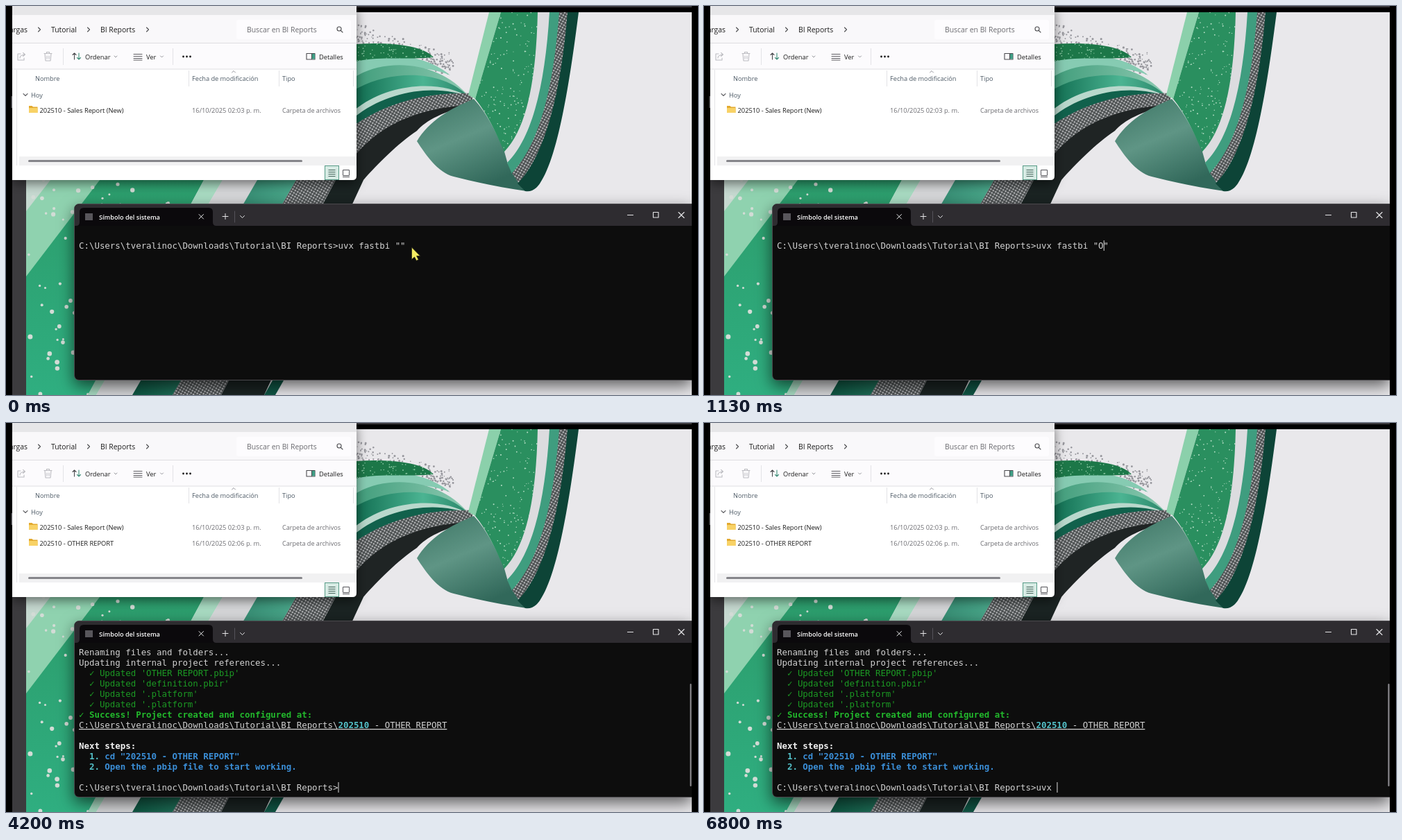
An HTML page that plays this animation: 997x561 px, repeating every 8 s.

```html
<!DOCTYPE html>
<html lang="es">
<head>
<meta charset="utf-8">
<title>Terminal</title>
<style>
  html, body { margin: 0; width: 100%; height: 100%; overflow: hidden; background: #000; }
  svg { display: block; width: 100%; height: 100%; }
  text { white-space: pre; }
  .ui { font: 9.3px "Open Sans", sans-serif; fill: #1c1c1c; }
  .ui .nav { font-size: 10.4px; }
  .ui .dim { fill: #6b6b70; }
  .ui .head { fill: #4d5a66; font-size: 9.2px; }
  .term { font: 12.425px "DejaVu Sans Mono", monospace; fill: #d2d2d2; }
  .ok { fill: #1c9a24; }
  .done { fill: #22b92c; font-weight: bold; }
  .num { fill: #55c3cb; font-weight: bold; }
  .cmd { fill: #3b8fd8; font-weight: bold; }
  .line { fill: none; stroke-linecap: round; stroke-linejoin: round; }
</style>
</head>
<body>
<svg viewBox="0 0 997 561" preserveAspectRatio="none">
  <defs>
    <pattern id="mesh" width="4" height="4" patternUnits="userSpaceOnUse" patternTransform="rotate(30)">
      <rect width="4" height="4" fill="#4b4f50"/><circle cx="2" cy="2" r="1.3" fill="#b9babc"/>
    </pattern>
    <linearGradient id="panel" x1="0" y1="0" x2=".5" y2="1">
      <stop offset="0" stop-color="#3c7564"/><stop offset=".5" stop-color="#5f9585"/><stop offset="1" stop-color="#31685a"/>
    </linearGradient>
    <linearGradient id="green" x1="0" y1="0" x2="0" y2="1">
      <stop offset="0" stop-color="#2c9d6c"/><stop offset="1" stop-color="#2fae80"/>
    </linearGradient>
    <linearGradient id="teal"><stop offset="0" stop-color="#0d5541"/><stop offset="1" stop-color="#4aa88b"/></linearGradient>
    <linearGradient id="arc"><stop offset="0" stop-color="#0f6b4f"/><stop offset=".6" stop-color="#4bb492"/><stop offset="1" stop-color="#2a8468"/></linearGradient>
    <linearGradient id="mint"><stop offset="0" stop-color="#3f9c7a"/><stop offset="1" stop-color="#8fcbb3"/></linearGradient>
    <clipPath id="inLeft"><path d="M29 251H285L118 561H29Z"/></clipPath>
    <clipPath id="inRight"><path d="M713 9H768C767 90 755 175 718 211C705 180 693 155 676 134Z"/></clipPath>
    <clipPath id="inBack"><path d="M504 55C550 52 600 56 616 74C580 78 540 72 504 80Z"/></clipPath>
    <clipPath id="stage"><rect x="9" width="979" height="561"/></clipPath>
    <filter id="shade" x="-10%" y="-15%" width="120%" height="130%">
      <feDropShadow dx="0" dy="5" stdDeviation="8" flood-opacity=".5"/>
    </filter>
    <filter id="deepShade" x="-10%" y="-25%" width="120%" height="150%">
      <feDropShadow dx="0" dy="8" stdDeviation="11" flood-opacity=".6"/>
    </filter>
  </defs>

  <rect width="997" height="561"/>
  <g clip-path="url(#stage)">
    <!-- wallpaper -->
    <rect x="505" width="483" height="2" fill="#38363a"/>
    <rect x="9" y="251" width="20" height="310" fill="#3c3b3e"/>
    <rect x="29" y="9" width="959" height="552" fill="#e9e8eb"/>
    <g id="cloud" fill="#96969c"/>
    <path d="M500 78C540 68 600 66 640 100C600 84 550 84 500 108Z" fill="#86cbb2"/>
    <path d="M504 55C550 52 600 56 616 74C580 78 540 72 504 80Z" fill="#1c7748"/>
    <g id="backDots" fill="#8cc9a4" clip-path="url(#inBack)"/>
    <path d="M500 104C545 74 625 78 668 132C620 98 560 96 500 126Z" fill="url(#mint)"/>
    <path d="M500 122C555 90 630 92 668 132C620 108 560 114 500 156Z" fill="url(#arc)"/>
    <path d="M500 152C545 112 625 104 668 132C610 118 560 137 500 178Z" fill="#b9d8cc"/>
    <path d="M500 162C550 120 625 112 668 132C610 122 555 145 500 192Z" fill="#11614c"/>
    <path d="M418 251C475 182 545 122 672 126V146C590 146 540 172 475 251Z" fill="url(#mesh)"/>
    <path d="M475 251C515 195 555 150 672 142C630 152 605 165 592 180C565 198 535 228 515 251Z" fill="#1f2424"/>
    <path d="M674 134C640 148 610 165 592 195C605 215 622 240 645 246C680 255 715 262 750 267C735 255 728 235 719 211C705 180 693 155 674 134Z" fill="url(#panel)"/>
    <path d="M696 9H713L676 134L666 128Z" fill="#8bd0ab"/>
    <path d="M713 9H768C767 90 755 175 718 211C705 180 693 155 676 134Z" fill="#2a8f5f"/>
    <g id="rightDots" fill="#b9e0c8" clip-path="url(#inRight)"/>
    <path d="M766 9H784C778 110 760 195 723 228L718 210C752 175 764 100 766 9Z" fill="#dcdcdf"/>
    <path d="M783 9H798C790 115 771 203 729 242L722 226C759 190 777 110 783 9Z" fill="#3f9d7f"/>
    <path d="M797 9H811C801 118 779 215 740 257L729 241C770 197 789 115 797 9Z" fill="url(#mesh)"/>
    <path d="M809 9H825C814 95 796 225 766 260Q758 269 748 267L737 256C778 215 800 120 809 9Z" fill="#0d4437"/>

    <path d="M29 251H285L118 561H29Z" fill="url(#green)"/>
    <path d="M29 251H135L29 390Z" fill="#8fd2af"/>
    <path d="M29 251H64L29 296Z" fill="#c6d9d0"/>
    <g id="leftDots" fill="#d3dcd6" clip-path="url(#inLeft)"/>
    <path d="M285 251H312L130 561H118Z" fill="#a9dcc3"/>
    <path d="M312 251H362L182 561H130Z" fill="#d6d7d9"/>
    <path d="M362 251H418L240 561H182Z" fill="url(#teal)"/>
    <path d="M418 251H475L310 561H240Z" fill="url(#mesh)"/>
    <path d="M475 251H515L372 561H310Z" fill="#1a2322"/>
    <path d="M384 540H400L388 561H372Z" fill="#0f5544"/>

    <!-- file window -->
    <g class="ui">
      <path d="M9 0H505V245Q505 251 499 251H9Z" fill="#fff" filter="url(#shade)"/>
      <rect x="9" width="496" height="13" fill="#e6e6e8"/>
      <rect x="9" y="13" width="496" height="40" fill="#f9f8fa"/>
      <rect x="332" y="20" width="165" height="28" rx="3" fill="#fdfcfe"/>
      <rect x="9" y="53" width="496" height="38" fill="#fcfbfd"/>
      <path d="M9 53.5H505M9 91H505" stroke="#dedee1"/>
      <path d="M263.5 93V116M393.5 93V116M500.5 93V116M15.5 92V230M82.5 61V85M240.5 61V85" stroke="#e3e3e6"/>
      <rect x="19" y="217" width="486" height="13" fill="#f1f1f2"/>
      <rect x="32" y="222" width="395" height="3" rx="1.5" fill="#85858a"/>
      <rect x="459.5" y="230.5" width="20" height="20" fill="#d7ebe4" stroke="#579b87"/>
      <path d="M464.500 236.500H474.500M464.500 239.500H474.500M464.500 242.500H474.500M464.500 245.500H474.500" stroke="#46625a"/>
      <path d="M485.500 236.500H494.500V244.500H485.500ZM485 246.500H495" fill="none" stroke="#55555a"/>
      <g class="line" stroke="#4a4a4e" stroke-width="1.1">
        <path d="M46.500 31L49.500 34L46.500 37M117.500 31L120.500 34L117.500 37M202.500 31L205.500 34L202.500 37"/>
        <circle cx="480" cy="33" r="3"/><path d="M482.300 35.300L485 38"/>
        <path d="M325.500 96L328 93.500L330.500 96M156 72L158 74L160 72M222.500 72L224.500 74L226.500 72" stroke="#8a8a90" stroke-width=".9"/>
        <path d="M25 126.500L28 129.500L31 126.500" stroke="#66666a"/>
        <path d="M98.500 77V68M96 70.500L98.500 68L101 70.500"/>
        <path d="M105 68V77M102.500 74.500L105 77L107.500 74.500" stroke="#3f8f7a"/>
        <path d="M184 69.500H196M184 72.500H196M184 75.500H196M184 78H196" stroke-width=".9"/>
        <path d="M433 68.500H445V77H433ZM440.500 68.500V77"/><path d="M441 69H445V76.500H441Z" fill="#3f9d85" stroke="none"/>
        <path d="M21 69H17V78H26V75M20 75Q20 71 27 70M24.500 67.500L27.500 70L24.500 72.500M55 68.500H66M58.500 68V66.500H62.500V68M56 69L57 79H64L65 69M59 72V76M62 72V76" stroke="#bcbcc1"/>
      </g>
      <g fill="#1c1c1c"><circle cx="255.500" cy="73" r="1.400"/><circle cx="260.500" cy="73" r="1.400"/><circle cx="265.500" cy="73" r="1.400"/></g>
      <g class="nav">
        <text x="31" y="38" text-anchor="end">Descargas</text>
        <text x="65" y="38">Tutorial</text>
        <text x="136" y="38">BI Reports</text>
        <text x="347" y="38" class="dim">Buscar en BI Reports</text>
      </g>
      <text x="114" y="76.500">Ordenar</text>
      <text x="202" y="76.500">Ver</text>
      <text x="451" y="76.500">Detalles</text>
      <text x="42" y="107.500" class="head">Nombre</text>
      <text x="268" y="107.500" class="head">Fecha de modificación</text>
      <text x="398" y="107.500" class="head">Tipo</text>
      <text x="36" y="132" class="head">Hoy</text>
      <g id="files"></g>
    </g>

    <!-- terminal window -->
    <path d="M988 285.500H106Q98.500 285.500 98.500 293V532Q98.500 539.500 106 539.500H988" fill="#0b090c" stroke="#4b494d" filter="url(#deepShade)"/>
    <path d="M988 286H106Q99 286 99 293V317H988Z" fill="#2e2c30"/>
    <path d="M101 317Q106 317 106 312V297Q106 291 112 291H292Q298 291 298 297V312Q298 317 303 317Z" fill="#0b090c"/>
    <rect x="114" y="299" width="11" height="10" fill="#58565b"/>
    <text class="ui" x="134" y="307.500" style="font-size:9.1px;font-weight:600;fill:#fff">Símbolo del sistema</text>
    <g class="line" stroke="#e4e4e6">
      <path d="M278 300.500L284.500 307M284.500 300.500L278 307M312 303.500H320M316 299.500V307.500M337.500 302.500L340.500 305.500L343.500 302.500"/>
      <path d="M895.500 301.500H903.500M932.500 297.500H940V305H932.500ZM969 297.500L977 305.500M977 297.500L969 305.500" stroke-width="1.150"/>
      <path d="M329.500 296V312" stroke="#55535a"/>
    </g>
    <g class="term">
      <g id="output">
        <text x="105" y="335">Renaming files and folders...</text>
        <text x="105" y="350">Updating internal project references...</text>
        <g class="ok">
          <text x="105" y="365">  ✓ Updated 'OTHER REPORT.pbip'</text>
          <text x="105" y="380">  ✓ Updated 'definition.pbir'</text>
          <text x="105" y="395">  ✓ Updated '.platform'</text>
          <text x="105" y="410">  ✓ Updated '.platform'</text>
        </g>
        <text x="105" y="425" class="done">✓ Success! Project created and configured at:</text>
        <text x="105" y="440" text-decoration="underline"><tspan class="home"></tspan>\<tspan class="num">202510</tspan> - OTHER REPORT</text>
        <text x="105" y="470" font-weight="bold" fill="#f2f2f2">Next steps:</text>
        <text x="105" y="485"><tspan class="num">  1. </tspan><tspan class="cmd">cd "202510 - OTHER REPORT"</tspan></text>
        <text x="105" y="500"><tspan class="num">  2. </tspan><tspan class="cmd">Open the .pbip file to start working.</tspan></text>
        <rect x="985.500" y="376" width="2" height="148" rx="1" fill="#929095"/>
      </g>
      <text id="prompt" x="105"><tspan class="home"></tspan><tspan id="typed"></tspan></text>
      <rect id="caret" width="1" height="15" fill="#dedede"/>
    </g>
    <path id="mouse" d="M584.500 348V365.500L588.500 362L591.300 367.300L594.300 365.800L591.600 360.500H596.800Z" fill="#f4ed62" stroke="#2b2a18" stroke-width=".8"/>
  </g>
  <rect x="7.500" y="130" width="1.500" height="17" fill="#5c5c60"/>
</svg>
<script>
const $ = id => document.getElementById(id);
const HOME = 'C:\\Users\\tveralinoc\\Downloads\\Tutorial\\BI Reports';
const CELL = 7.48, LOOP = 8000;

let seed = 7;
const rnd = () => (seed = (seed * 16807) % 2147483647) / 2147483647;

function dots(id, count, place) {
  let out = '';
  for (let i = 0; i < count; i++) {
    const [x, y, r] = place();
    out += `<circle cx="${x.toFixed(1)}" cy="${y.toFixed(1)}" r="${r.toFixed(1)}"/>`;
  }
  $(id).innerHTML = out;
}
dots('cloud', 230, () => {
  const u = rnd();
  return [500 + u * 145, 22 + u * 45 + (rnd() + rnd()) * (24 - u * 6), .7 + rnd() * .9];
});
dots('backDots', 90, () => [504 + rnd() * 115, 53 + rnd() * 28, .6 + rnd() * .4]);
dots('rightDots', 260, () => [670 + rnd() * 100, 9 + rnd() * 204, .5 + rnd() * .5]);
dots('leftDots', 120, () => [29 + rnd() * 262, 251 + rnd() * 310, 1.5 + rnd() * 2]);

const fileRow = (name, time, y, id) => `<g id="${id}">
  <path d="M33 ${y - 8}h4.500l1.500 1.500h6.500v8.500h-12.500z" fill="#e2a92f"/>
  <rect x="33" y="${y - 5}" width="12.500" height="7" rx=".8" fill="#f8d266"/>
  <text x="48.500" y="${y}" dy="2">${name}</text>
  <text x="268" y="${y}" dy="2" class="dim">16/10/2025 ${time} p. m.</text>
  <text x="398" y="${y}" dy="2" class="dim" style="font-size:9.1px">Carpeta de archivos</text></g>`;
$('files').innerHTML = fileRow('202510 - Sales Report (New)', '02:03', 152, 'row1')
                     + fileRow('202510 - OTHER REPORT', '02:06', 175, 'row2');
for (const el of document.querySelectorAll('.home')) el.textContent = HOME;

// [start time, letters typed]
const nameKeys = [[0, 0], [1130, 1], [1400, 2], [1730, 4], [2070, 5], [2600, 6], [2730, 7], [2870, 8], [2930, 10], [3000, 11], [3200, 12]];
const nextKeys = [[0, 0], [6070, 2], [6800, 4]];
const typedAt = (keys, t) => keys.filter(k => k[0] <= t).pop()[1];
const caretOff = [[0, 70], [600, 1130], [4800, 5270], [5870, 6070]];
const show = (id, on) => $(id).setAttribute('visibility', on ? 'visible' : 'hidden');

function draw(t) {
  const done = t >= 4200;
  const before = done ? 'uvx '.slice(0, typedAt(nextKeys, t))
                      : 'uvx fastbi "' + 'OTHER REPORT'.slice(0, typedAt(nameKeys, t));
  const y = done ? 530 : 350;
  $('typed').textContent = '>' + before + (done ? '' : '"');
  $('prompt').setAttribute('y', y);
  $('caret').setAttribute('x', 105 + CELL * (HOME.length + 1 + before.length) - .5);
  $('caret').setAttribute('y', y - 12);
  show('caret', !caretOff.some(([a, b]) => t >= a && t < b));
  show('output', done);
  show('row2', done);
  show('mouse', t < 1130);
}

const start = performance.now();
function tick() {
  draw((performance.now() - start) % LOOP);
  requestAnimationFrame(tick);
}
tick();
</script>
</body>
</html>
```
